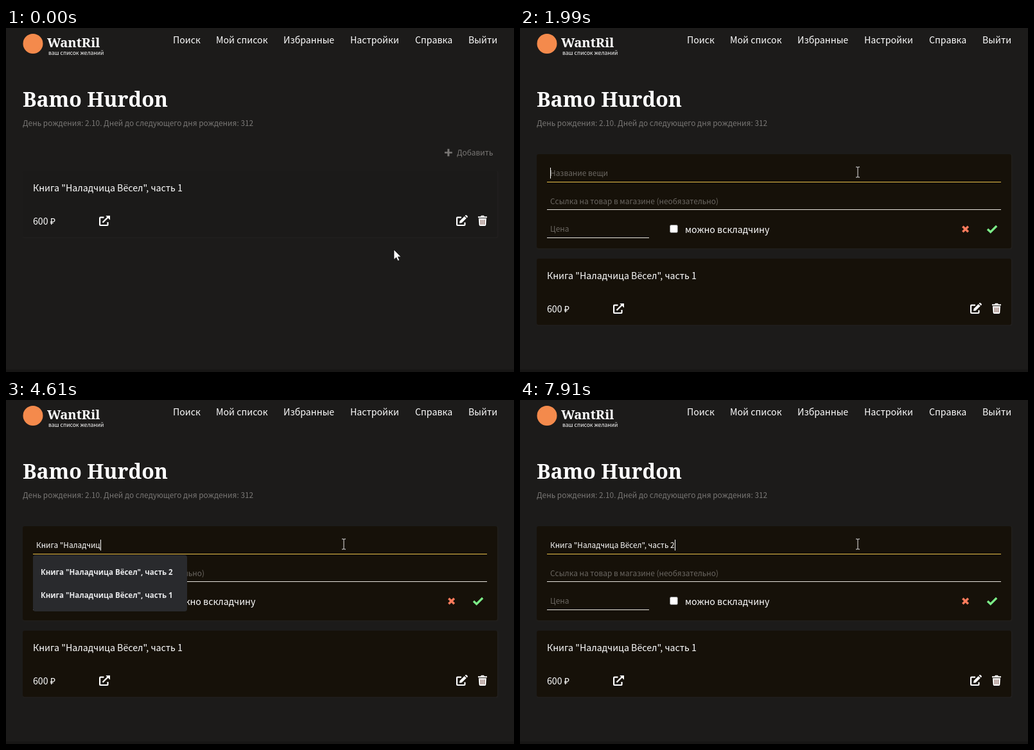
An HTML page for the animation above (8 s loop, 791 by 537 pixels).

```html
<!DOCTYPE html>
<html lang="ru">
<head>
<meta charset="utf-8">
<title>Список желаний</title>
<style>
html, body { margin: 0; width: 100%; height: 100%; overflow: hidden; background: #1c1b1a; }
svg { display: block; width: 791px; height: 537px; }
text { font: 500 14.2px "Noto Sans CJK JP", "Noto Sans CJK SC", "Noto Sans", sans-serif; fill: #fff; white-space: pre; }
.serif { font-family: "Noto Serif", serif; font-weight: 700; }
.title { font-size: 32px; }
.brand { font-size: 20.2px; }
.tag { font-size: 8.5px; }
.info { font-size: 11.9px; font-weight: 400; fill: #797775; }
.field { font-size: 11.8px; }
.hint { font-size: 11.9px; font-weight: 400; fill: #6b6762; }
.item { font: 700 11.5px "Open Sans", "Noto Sans", sans-serif; fill: #e9eaec; }
</style>
</head>
<body>
<svg viewBox="0 0 791 537">
  <rect width="791" height="537" fill="#1c1b1a"/>
  <rect y="533" width="791" height="4" fill="#171615"/>

  <circle cx="42" cy="24.5" r="15.5" fill="#f48a4c"/>
  <text class="serif brand" x="64" y="30">WantRil</text>
  <text class="tag" x="66" y="42">ваш список желаний</text>
  <g id="nav"></g>
  <text class="serif title" x="26" y="123">Bamo Hurdon</text>
  <text class="info" x="26" y="153">День рождения: 2.10. Дней до следующего дня рождения: 312</text>

  <g id="add" fill="#797775">
    <path d="M683 193.2h4.4v-4.4h3v4.4h4.4v2.6h-4.4v4.4h-3v-4.4H683z"/>
    <text class="info" style="fill:inherit" x="702" y="199">Добавить</text>
  </g>

  <g id="card">
    <rect x="26" y="223" width="740.5" height="105" rx="3" fill="#211f1e"/>
    <rect id="face" x="26" y="223" width="739" height="103.5" rx="3"/>
    <text x="42" y="255" id="owned"></text>
    <text x="42" y="307">600 ₽</text>
    <g fill="none" stroke="#fff" stroke-width="2.2" stroke-linejoin="round">
      <path d="M152.500 295.600H147.200Q146.100 295.600 146.100 296.700V306.900Q146.100 308 147.200 308H157.400Q158.500 308 158.500 306.900V303"/>
      <path d="M150.500 303.600L159 295.100"/>
      <path d="M709 295.600H703Q702.100 295.600 702.100 296.600V307Q702.100 308 703.100 308H713.500Q714.500 308 714.500 307V303.500"/>
    </g>
    <g fill="#fff">
      <path d="M155.300 293h6.700v6.700l-2.200-2.200-2.300-2.300z"/>
      <path d="M706 304.800l.5-3.600 7.300-7.300 3.100 3.100-7.300 7.300zM714.600 293.100l.8-.8q1-.8 2 .1l1.100 1.100q.9 1 .1 2l-.8.800z"/>
      <path d="M735 294.200h4l1-1.400h4l1 1.400h4v2h-14zM736 297.300h12l-.7 10.300q-.1 1.400-1.500 1.400h-7.600q-1.400 0-1.500-1.400z"/>
    </g>
    <path d="M739.500 299.300v7.700M742 299.300v7.700M744.500 299.300v7.700" stroke="#6b4037" stroke-width="1"/>
  </g>

  <g id="form">
    <rect x="26" y="197" width="740.5" height="148.500" rx="3" fill="#211f1c"/>
    <rect x="26" y="197" width="739" height="147" rx="3" fill="#161109"/>
    <path d="M42 240.500H749" stroke="#e9c04a"/>
    <path d="M42 283.500H749M42 327.500H201" stroke="#e8e5df"/>
    <text class="hint" id="hint" x="47" y="231">Название вещи</text>
    <text class="hint" x="47" y="275">Ссылка на товар в магазине (необязательно)</text>
    <text class="hint" x="47" y="318">Цена</text>
    <rect x="233.500" y="307.500" width="12" height="12" rx="2" fill="#fff" stroke="#767676"/>
    <text x="257" y="320">можно вскладчину</text>
    <path d="M689.300 309.700l8.600 8.600M697.900 309.700l-8.600 8.600" stroke="#fb7b5c" stroke-width="3.400"/>
    <path d="M728 314l4.700 4.500 9.500-9.500" fill="none" stroke="#7cec88" stroke-width="3.300"/>
    <text class="field" id="typed" x="47" y="231"></text>
    <rect id="caret" y="218" width="1" height="17" fill="#fff"/>
  </g>

  <g id="popup">
    <rect id="sheet" x="42" y="242" rx="4" fill="#292a2d"/>
    <g id="items"></g>
  </g>

  <g id="arrow"><path d="M0 0V15.500L3.700 12.200 6.200 17.500 8.700 16.400 6.300 11.200H11z" fill="#fff" stroke="#000" stroke-width=".7"/></g>
  <g id="hand"><path d="M0 1Q0-.5 1.300-.5T2.600 1V6Q5 5 5.400 6.500 7.500 5.800 8 7.300 10.500 6.700 10.500 9V12Q10.500 14 9 15.500V17.500H1.500V15.800L-3.300 10.500Q-4 9-2.500 8.600L0 10z" fill="#fff" stroke="#000" stroke-width=".8"/></g>
  <g id="beam"><path d="M-3 -8H-1Q0-8 0-7 0-8 1-8H3M0-7V7M-3 8H-1Q0 8 0 7 0 8 1 8H3" fill="none" stroke="#e6e6e6"/></g>
</svg>

<script>
const LOOP = 8000, OPEN = 950, POPUP = 2260, DONE = 7910;
const book = 'Книга "Наладчица Вёсел", часть ';
const goal = book + 2;
const list = [goal, 'Котучие штучки', book + 1, 'Книга Python для умственно отсталых!',
  'Конфигуратор Brevuli', 'Конфигуратор серверов'];

// [time, letters typed]
const typing = [[0, 0], [2110, 1], [2390, 2], [2520, 3], [2650, 4], [2780, 5], [2910, 6], [3050, 7],
  [3480, 8], [3620, 9], [3770, 10], [3910, 12], [4340, 13], [4610, 15], [4750, 16],
  [5030, 17], [5160, 18], [5300, 19], [5590, 20], [5740, 21], [5890, 22], [6310, 23], [6570, 24],
  [6870, 25], [7000, 26], [7120, 27], [7390, 29], [7670, 30], [7790, 31], [7910, 32]];

// [time, pointer shape, x, y]
const moves = [[0, 'arrow', 604, 346], [150, 'arrow', 612, 334], [280, 'arrow', 646, 288],
  [410, 'arrow', 690, 236], [540, 'hand', 717, 201], [660, 'hand', 724, 192],
  [1080, 'arrow', 668, 205], [1200, 'beam', 570, 221], [1330, 'beam', 526, 225]];

// [time, form opacity]: a one second ease, sampled
const fade = [[0, 0], [950, .08], [1080, .29], [1200, .5], [1330, .7], [1450, .82],
  [1580, .91], [1710, .96], [1990, 1]];

const $ = id => document.getElementById(id);
const at = (steps, t) => steps.findLast(s => s[0] <= t);
const show = (id, on) => $(id).setAttribute('visibility', on ? 'visible' : 'hidden');

function label(parent, x, y, str, cls) {
  const el = document.createElementNS('http://www.w3.org/2000/svg', 'text');
  el.setAttribute('x', x);
  el.setAttribute('y', y);
  if (cls) el.setAttribute('class', cls);
  el.textContent = str;
  parent.append(el);
}

[['Поиск', 260], ['Мой список', 327], ['Избранные', 432], ['Настройки', 536],
  ['Справка', 637], ['Выйти', 720]].forEach(([s, x]) => label($('nav'), x, 24, s));
$('owned').textContent = book + 1;

let lastText = null;
function type(text) {
  if (text === lastText) return;
  lastText = text;
  $('typed').textContent = text;
  const found = list.filter(s => s.startsWith(text));
  $('sheet').setAttribute('width', found.includes(list[3]) ? 276 : 240);
  $('sheet').setAttribute('height', 16 + 36 * found.length);
  $('items').replaceChildren();
  found.forEach((s, i) => label($('items'), 54, 273 + 36 * i, s, 'item'));
}

function draw(t) {
  const open = t >= OPEN;
  const [, shape, x, y] = at(moves, t);
  for (const id of ['arrow', 'hand', 'beam']) show(id, id === shape);
  $(shape).setAttribute('transform', `translate(${x} ${y})`);

  show('add', !open);
  $('add').setAttribute('fill', shape === 'hand' ? '#fff' : '#797775');
  $('card').setAttribute('transform', `translate(0 ${open ? 137 : 0})`);
  $('face').setAttribute('fill', open ? '#161109' : '#1b1a19');
  $('form').setAttribute('opacity', at(fade, t)[1]);

  const text = goal.slice(0, at(typing, t)[1]);
  type(text);
  show('hint', !text);
  show('caret', t < 1450 || t >= 1990);
  $('caret').setAttribute('x', Math.round(47 + (text ? $('typed').getComputedTextLength() : 0)));
  show('popup', t >= POPUP && t < DONE);
}

function tick() {
  draw(performance.now() % LOOP);
  requestAnimationFrame(tick);
}
tick();
</script>
</body>
</html>
```
